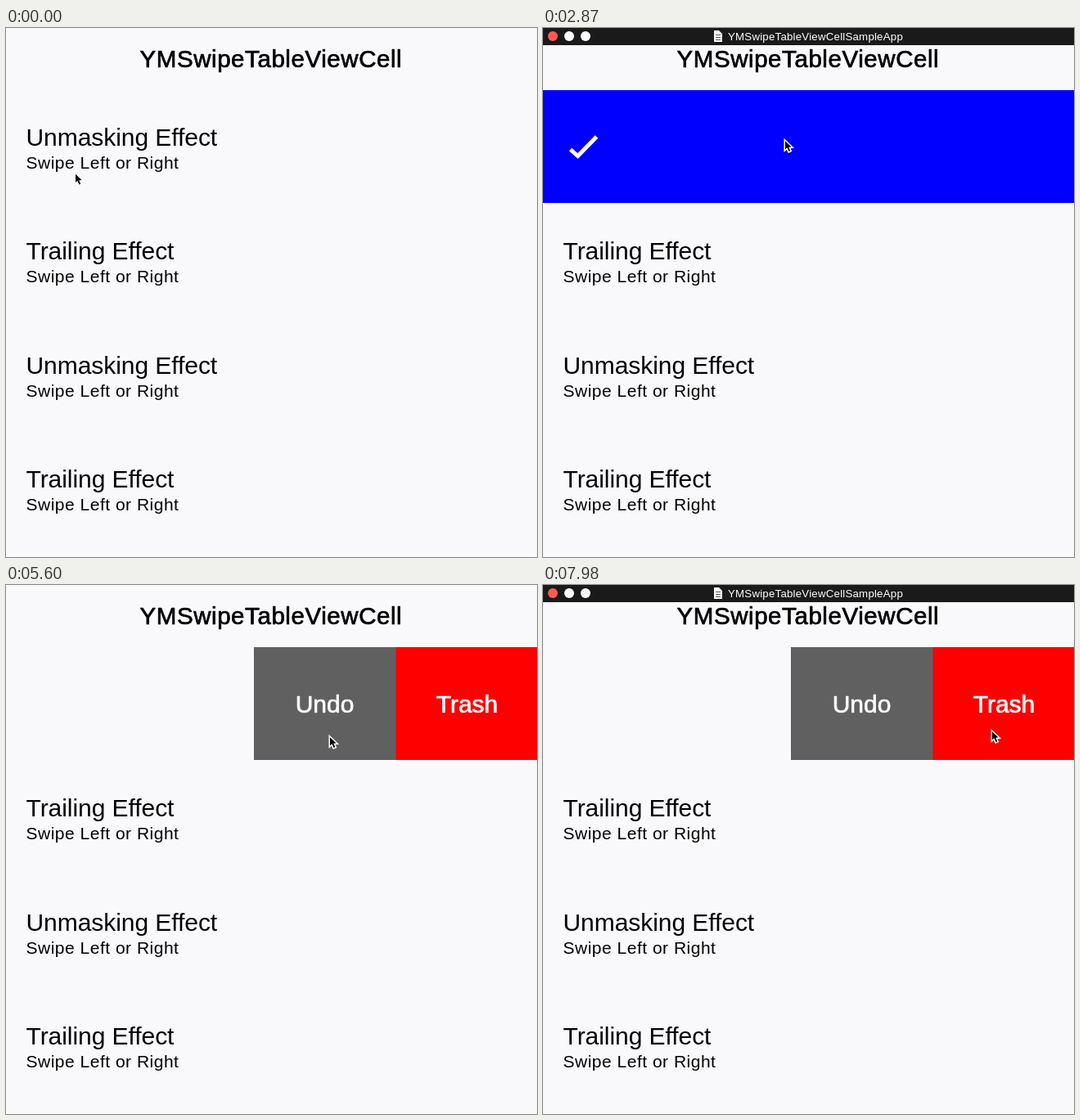
An HTML page with a canvas that plays this animation: 649x647 px, repeating every 8000 ms.

```html
<!DOCTYPE html>
<html lang="en">
<head>
<meta charset="utf-8">
<title>Swipe cells</title>
<style>
  html, body { margin: 0; width: 100%; height: 100%; overflow: hidden; background: #f9f9fc; }
  canvas { display: block; }
</style>
</head>
<body>
<canvas id="stage" width="649" height="647"></canvas>
<script>
const ctx = document.getElementById('stage').getContext('2d');
const W = 649, H = 647, LOOP = 8000, STEP = 70;
const ROW_TOP = 76, ROW_H = 138, ROW_PITCH = 139.5;
const ACTIONS = 346, SNAP = 280, FADE = 280, TRAVEL = 840;
const BG = '#f9f9fc';
const FONT = '"Liberation Sans", Arial, sans-serif';

// A drag moves the cell with the pointer; on release the cell snaps to its goal.
const swipes = [
  { start: 1300, end: 1930, from: [84, 176.5], to: [290, 142], goal: W },
  { start: 3220, end: 3640, from: [295, 136], to: [130, 146], goal: 0 },
  { start: 4550, end: 4970, from: [595, 182], to: [395, 184], goal: -ACTIONS },
  { start: 6020, end: 6300, from: [395, 184], to: [558, 188], goal: 0 },
  { start: 6950, end: 7140, from: [575, 186], to: [420, 182], goal: -ACTIONS }
];
const parked = [548, 177];

const ramp = (t, start, length) => Math.min(1, Math.max(0, (t - start) / length));
const ease = p => p * p * (3 - 2 * p);
const mix = (a, b, p) => a + (b - a) * p;

function pose(t) {
  let dx = 0, [x, y] = swipes[0].from;
  swipes.forEach((s, i) => {
    if (t < s.start) return;
    const drag = ease(ramp(t, s.start, s.end - s.start));
    const snap = ease(ramp(t, s.end, SNAP));
    const move = ease(ramp(t, s.end, TRAVEL));
    const next = i + 1 < swipes.length ? swipes[i + 1].from : parked;
    dx = mix(dx + (s.to[0] - s.from[0]) * drag, s.goal, snap);
    [x, y] = [0, 1].map(k => mix(mix(s.from[k], s.to[k], drag), next[k], move));
  });
  return { dx, x, y };
}

// The title bar shows, hides after a rest, and shows again.
const barAlpha = t => ramp(t, 210, FADE) - ramp(t, 5320, FADE) + ramp(t, 6020, FADE);

function rect(color, x, y, w, h) {
  ctx.fillStyle = color;
  ctx.fillRect(x, y, w, h);
}

function text(str, x, y, size, { color = '#000', gap = 0, weight = 0, align = 'left' } = {}) {
  ctx.font = `${size}px ${FONT}`;
  ctx.letterSpacing = gap + 'px';
  ctx.textAlign = align;
  ctx.fillStyle = ctx.strokeStyle = color;
  ctx.fillText(str, x, y);
  if (weight) {
    ctx.lineWidth = weight;
    ctx.lineJoin = 'round';
    ctx.strokeText(str, x, y);
  }
}

function trace(points) {
  ctx.beginPath();
  points.forEach(([x, y]) => ctx.lineTo(x, y));
}

function dot(color, x, y, r) {
  ctx.fillStyle = color;
  ctx.beginPath();
  ctx.arc(x, y, r, 0, Math.PI * 2);
  ctx.fill();
}

function clipped(x, width, paint) {
  ctx.save();
  ctx.beginPath();
  ctx.rect(x, ROW_TOP, width, ROW_H);
  ctx.clip();
  paint();
  ctx.restore();
}

function drawLabels(row, dx) {
  const y = Math.floor(row * ROW_PITCH);
  text(row % 2 ? 'Trailing Effect' : 'Unmasking Effect', 24.5 + dx, 144 + y, 30, { gap: -0.06 });
  text('Swipe Left or Right', 24.5 + dx, 172 + y, 21, { gap: 0.5 });
}

function drawDone() {
  rect('#0000ff', 0, ROW_TOP, W, ROW_H);
  trace([[33.5, 148.5], [42.5, 156.5], [65.5, 133]]);
  ctx.strokeStyle = '#fff';
  ctx.lineWidth = 5;
  ctx.lineJoin = 'miter';
  ctx.stroke();
}

function drawActions() {
  const label = { color: '#fff', weight: 0.7, align: 'center' };
  rect('#606060', W - ACTIONS, ROW_TOP, ACTIONS, ROW_H);
  rect('#ff0000', 476.5, ROW_TOP, W - 476.5, ROW_H);
  text('Undo', 389.5, 156, 30, label);
  text('Trash', 563.5, 156, 30, label);
}

function drawBar(alpha) {
  ctx.save();
  ctx.globalAlpha = alpha;
  rect('#1a1a1a', 0, 0, W, 21);
  ['#ff5a52', '#fff', '#fff'].forEach((color, i) => dot(color, 12 + 20 * i, 10, 6));
  trace([[209, 3], [215, 3], [219, 7], [219, 17], [209, 17]]);
  ctx.fillStyle = '#fff';
  ctx.fill();
  for (let y = 8; y < 16; y += 3) rect('#555', 211, y, 6, 1);
  text('YMSwipeTableViewCellSampleApp', 226, 15, 13.3, { color: '#fff', gap: 0.2 });
  ctx.restore();
}

function drawPointer(x, y) {
  ctx.save();
  ctx.translate(x, y);
  trace([[1, 2.2], [1, 12.5], [3.4, 10.3], [5.5, 15], [7.3, 14.2], [5.2, 9.8], [8.6, 9.6]]);
  ctx.closePath();
  ctx.strokeStyle = '#fff';
  ctx.lineWidth = 3;
  ctx.lineJoin = 'miter';
  ctx.stroke();
  ctx.fillStyle = '#000';
  ctx.fill();
  ctx.restore();
}

function draw(t) {
  const { dx, x, y } = pose(t);
  rect(BG, 0, 0, W, H);
  text('YMSwipeTableViewCell', 163.5, 48, 29.5, { gap: 0.57, weight: 0.7 });
  for (let row = 0; row < 4; row++) drawLabels(row, row ? 0 : dx);
  if (dx > 0) clipped(0, dx, drawDone);
  if (dx < 0) clipped(W + dx, -dx, drawActions);
  drawBar(barAlpha(t));
  drawPointer(x, y);
}

const start = performance.now();
function tick() {
  const t = (performance.now() - start) % LOOP;
  draw(Math.floor(t / STEP) * STEP);
  requestAnimationFrame(tick);
}
tick();
</script>
</body>
</html>
```
